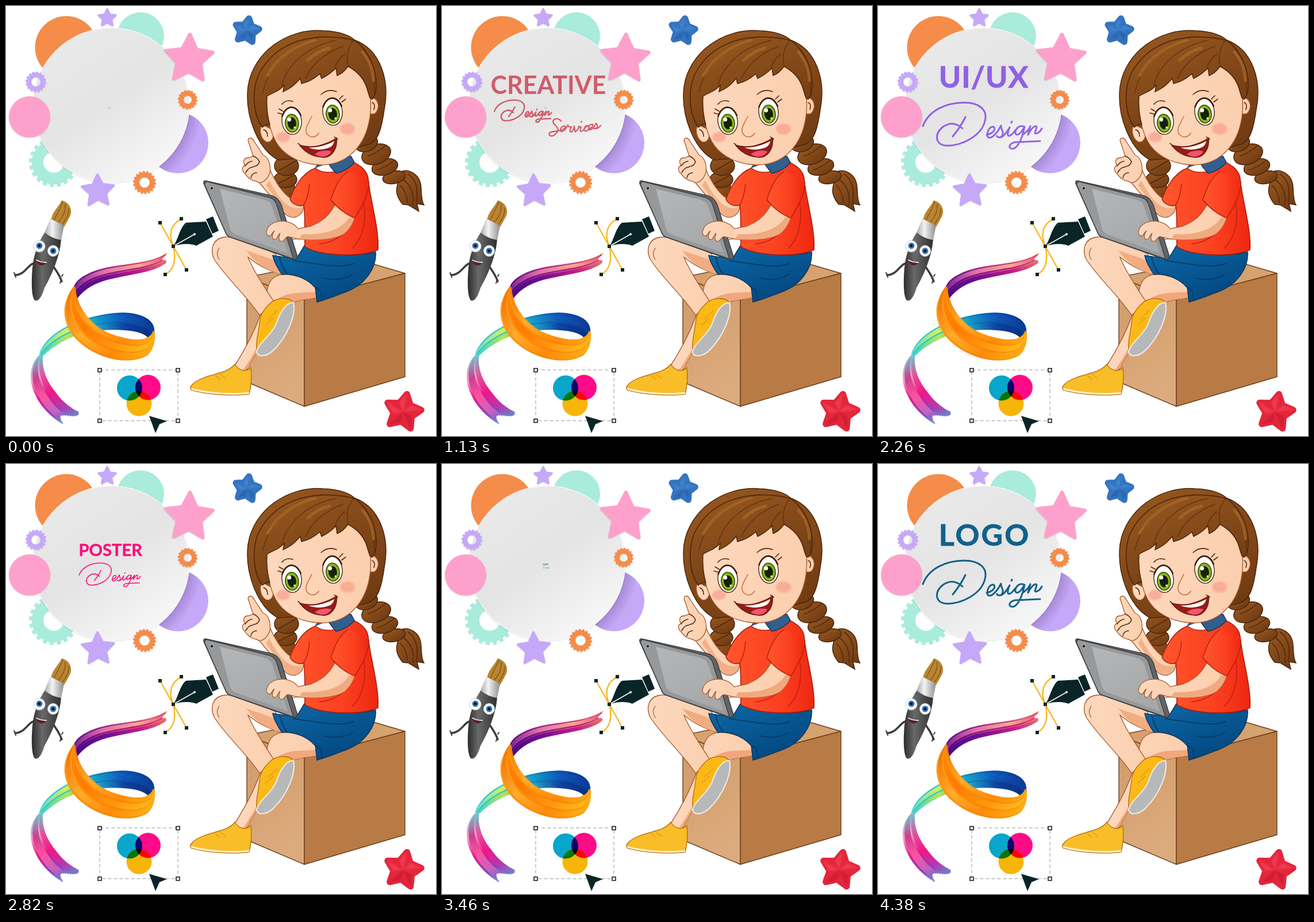
Write an HTML page that moves like this. It is 748x748 px and loops after 4590 ms.

```html
<!DOCTYPE html>
<html lang="en">
<head>
<meta charset="utf-8">
<title>Creative design services</title>
<style>
html, body { margin: 0; width: 100%; height: 100%; overflow: hidden; background: #fff }
svg { display: block; width: 100%; height: 100% }
.word text { font: 700 52px Lato, sans-serif; text-anchor: middle; fill: currentColor; stroke: currentColor; stroke-width: .8 }
.script { fill: none; stroke: currentColor; stroke-width: 3; stroke-linecap: round; stroke-linejoin: round }
.skin { fill: url(#skin); stroke: #a8572b; stroke-width: 1.3 }
.hair { fill: url(#hair); stroke: #4b250c; stroke-width: 1.5 }
.line { fill: none; stroke: #54290f; stroke-width: 1.6; stroke-linecap: round }
.soft { filter: drop-shadow(0 1px 1px #0002) }
.blur { filter: blur(1.5px) }
.mix { isolation: isolate }
.mix circle { mix-blend-mode: multiply }
</style>
</head>
<body>
<svg viewBox="0 0 748 748">
<defs>
  <linearGradient id="disc" x1=".2" y1=".1" x2=".8" y2=".95"><stop stop-color="#e9e9e9"/><stop offset=".45" stop-color="#e4e4e4"/><stop offset="1" stop-color="#f8f8f8"/></linearGradient>
  <radialGradient id="shade" gradientUnits="userSpaceOnUse" cx="183" cy="172" r="160"><stop offset=".83" stop-color="#a286d2"/><stop offset="1" stop-color="#c6a8f9"/></radialGradient>
  <linearGradient id="skin"><stop stop-color="#fdd8bd"/><stop offset="1" stop-color="#fbcfae"/></linearGradient>
  <linearGradient id="hair" x1=".2" y1="0" x2=".8" y2="1"><stop stop-color="#96571f"/><stop offset="1" stop-color="#6f3a12"/></linearGradient>
  <linearGradient id="shirt"><stop stop-color="#ff562c"/><stop offset=".6" stop-color="#fb4020"/><stop offset="1" stop-color="#ee2811"/></linearGradient>
  <linearGradient id="blue" x2=".7" y2="1"><stop stop-color="#0c6aa8"/><stop offset="1" stop-color="#034680"/></linearGradient>
  <linearGradient id="pad" x2=".6" y2="1"><stop stop-color="#b4b6b8"/><stop offset="1" stop-color="#a6a8aa"/></linearGradient>
  <linearGradient id="side" y2="1" x2=".3"><stop stop-color="#cf9a68"/><stop offset="1" stop-color="#dcab7d"/></linearGradient>
  <linearGradient id="ferrule"><stop stop-color="#aaa"/><stop offset=".4" stop-color="#f3f3f3"/><stop offset="1" stop-color="#8d8d8d"/></linearGradient>
  <linearGradient id="handle"><stop stop-color="#2c2c2c"/><stop offset=".35" stop-color="#696969"/><stop offset="1" stop-color="#303030"/></linearGradient>
  <path id="design" d="M78 209C88 182 118 168 150 168C178 168 191 182 186 200C180 226 146 243 120 243C100 242 97 224 112 211C124 202 136 203 147 213M152 193C146 206 138 217 130 227M189 224C200 222 206 214 201 210C194 209 188 220 191 228C196 232 206 224 214 208C213 214 221 220 215 227C211 230 207 228 207 226M215 228C222 224 226 216 229 211C226 218 224 226 228 226C232 226 236 220 239 216M232 203l1-2M254 210C246 206 238 214 239 222C243 228 251 218 255 210C252 224 246 244 236 248C226 250 226 240 238 237L282 235M253 223C260 218 264 212 265 209L261 224C266 214 273 206 276 210C276 216 270 222 275 222C280 221 283 217 285 213"/>
</defs>

<g id="back"></g>
<ellipse class="soft" cx="183" cy="172.500" rx="136" ry="134.500" fill="url(#disc)" stroke="#fff"/>
<g id="front" class="soft"></g>

<g class="word" color="#c4091f">
  <text x="185" y="153" style="font-size:43px;stroke:none">CREATIVE</text>
  <use href="#design" class="script" transform="translate(53.600 83) scale(.48)" style="stroke-width:5"/>
  <path class="script" style="stroke-width:2.300" d="M207 200C202 193 190 196 194 204C200 211 206 214 198 222C192 229 184 226 187 221C190 217 200 219 207 216q9-3 7-7q-6-1-8 6q1 7 9-1l4-7q0 4 6 3q-5 10 0 9q4-2 5-10q1 9 2 10q6-5 6-10q2 3 4 1q-3 8 0 8q3 0 6-5q5-6 8-4q-7-3-9 6q2 6 10-2q7-3 5-7q-6-1-7 6q1 7 9-1l4-7q5 6 0 9l-4 0q6 2 12-5M242 202l1-1"/>
</g>
<g class="word" color="#5a10e6">
  <text x="184" y="142" letter-spacing="1">UI/UX</text>
  <use href="#design" class="script"/>
</g>
<g class="word" color="#ff0a7a">
  <text x="183.500" y="140" style="font-size:60px">POSTER</text>
  <use href="#design" class="script" transform="translate(-11.500 -12) scale(1.060)"/>
</g>
<g class="word" color="#11618a">
  <text x="185.500" y="142" letter-spacing="3">LOGO</text>
  <use href="#design" class="script"/>
</g>

<!-- brush character -->
<g stroke-linecap="round">
  <path d="M47 448C38 451 32 468 16 468M79 444C80 454 90 460 97 479" fill="none" stroke="#3b3b3b" stroke-width="3.500"/>
  <path d="M16 468l-2-4m2 4l1 4M97 470l2-3m-3 9l-2 6" stroke="#3b3b3b" stroke-width="2"/>
  <path d="M78 374C80 358 90 352 97 338C112 342 118 358 109 370C106 377 103 380 101 385Z" fill="#b98532"/>
  <path d="M84 372Q92 356 99 341M91 376Q104 362 103 345M98 380Q110 365 109 352" fill="none" stroke="#8b5c16" stroke-width="1.500"/>
  <path d="M68 393L96 404C95 432 80 468 67 490C62 507 56 515 50 512C44 505 44 480 46 455C48 435 55 412 68 393Z" fill="url(#handle)"/>
  <path d="M77 370L101 382L96 407Q81 405 67 394Z" fill="url(#ferrule)"/>
  <path d="M51 441Q60 446 71 445Q67 453 59 451Q53 448 51 441Z" fill="#5c2224"/>
  <path d="M53 442Q60 446 70 446" fill="none" stroke="#eee" stroke-width="2"/>
  <path d="M66 423Q61 436 66 439Q71 438 69 425" fill="#666"/>
  <g stroke="#c9d3dc"><circle cx="58" cy="418" r="10" fill="#fff"/><circle cx="82" cy="426" r="9.500" fill="#fff"/></g>
  <circle cx="58" cy="417" r="5.500" fill="#3477bd"/><circle cx="82" cy="426" r="5.500" fill="#3477bd"/>
  <circle cx="58" cy="417" r="2.500" fill="#111"/><circle cx="82" cy="426" r="2.500" fill="#111"/>
</g>

<g id="ribbon" fill="none"></g>

<!-- pen tool -->
<path d="M268 377L314 459M305 370C280 384 286 406 291 418C296 440 294 458 277 467" fill="none" stroke="#f8b41a" stroke-width="2.200"/>
<path d="M291 418C300 405 302 386 313 377L348 375L360 401L331 417C318 412 304 414 291 418ZM348 371L360 366L370 391L359 396Z" fill="#0a2528"/>
<path d="M291 418L328 397" stroke="#fff" stroke-width="1.500"/><circle cx="328" cy="397" r="2" fill="#fff"/>
<path d="M265 374h6v6h-6zM302 367h6v6h-6zM288 415h6v6h-6zM274 464h6v6h-6zM311 456h6v6h-6z" fill="#0a2528"/>

<!-- colour circles -->
<rect x="163" y="633" width="136" height="88.500" fill="none" stroke="#9a9a9a" stroke-dasharray="6 4"/>
<path d="M160 630.500h6v6h-6zM296 630.500h6v6h-6zM160 718.500h6v6h-6zM296 718.500h6v6h-6z" fill="#fff" stroke="#111" stroke-width="1.500"/>
<g class="mix"><circle cx="215" cy="664.500" r="22" fill="#09a5cb"/><circle cx="247" cy="663.500" r="22" fill="#ff0a87"/><circle cx="231.500" cy="691.500" r="22" fill="#f7b50a"/></g>
<path d="M249 713L280 722L267 727.500L260 743Z" fill="#0a2528"/>

<!-- box -->
<g stroke="#6d3f1d" stroke-width="1.400" stroke-linejoin="round">
  <path d="M419 472L595 436L694 465L519 511Z" fill="#d6a26f"/>
  <path d="M419 472L519 511V696.500L419 654Z" fill="url(#side)"/>
  <path d="M519 511L694 465V645L519 696.500Z" fill="#b87b45"/>
</g>

<!-- braids and hair -->
<g class="hair">
  <path d="M472 308C464 325 468 340 482 350C495 340 505 325 501 308Z"/>
  <ellipse cx="486" cy="302" rx="20" ry="14"/>
  <ellipse cx="488" cy="278" rx="21" ry="17"/>
  <path d="M684 301C678 285 700 281 714 295C728 310 718 330 727 346L715 344L718 357L700 346L690 345C676 328 678 318 684 301Z"/>
  <ellipse cx="675" cy="298" rx="20" ry="11" transform="rotate(-12 675 298)"/>
  <ellipse cx="659" cy="280" rx="23" ry="14" transform="rotate(-15 659 280)"/>
  <ellipse cx="644" cy="258" rx="26" ry="17" transform="rotate(-20 644 258)"/>
  <ellipse cx="627" cy="239" rx="20" ry="14" transform="rotate(-20 627 239)"/>
  <path d="M474 268C438 250 415 190 421 140C430 80 490 38 552 43C580 44 598 51 606 59C652 76 668 130 658 180C654 210 648 236 630 241L560 260Z"/>
</g>
<path class="line" d="M475 286Q490 278 505 269M473 309Q486 303 502 294M630 261Q645 256 661 242M646 285Q660 281 676 268M691 302Q711 316 708 346M699 292Q720 306 714 342M686 312Q697 322 698 342"/>

<!-- legs -->
<path class="skin" d="M545 490C520 470 485 462 470 470C450 480 456 505 448 520C440 548 424 585 395 630C404 640 415 638 421 630C432 607 441 595 450 582L480 530C492 510 520 512 545 506Z"/>
<path d="M463 520C458 560 438 595 412 634L421 630C432 607 441 595 450 582L480 530C492 510 520 512 545 506L542 497C510 500 480 495 463 520Z" fill="#f0a77c"/>
<path class="skin" d="M469 431C440 416 405 400 380 402C358 405 355 425 362 440C380 470 420 505 441 538L467 516C454 495 432 465 421 437C440 452 455 460 480 467Z"/>
<path d="M418 425C438 433 460 438 474 446L480 467C455 460 435 450 418 425Z" fill="#f2ac82"/>
<path class="line" d="M371 421Q364 431 371 441" stroke-width="1" opacity=".5"/>
<g stroke="#b06c10" stroke-width="1.300">
  <path d="M462 515C476 505 498 508 500 518C487 526 479 542 471 557C461 577 441 587 437 601C433 588 440 565 442 545C444 532 454 522 462 515Z" fill="#fbb917"/>
  <path d="M500 516C505 536 490 575 464 600C452 611 436 611 436 601C440 585 462 573 470 553C476 535 485 516 500 516Z" fill="#b6b8ba" stroke="#eee" stroke-width="2"/>
  <path d="M456 545l16-15m-20 25l14-13" fill="none" stroke="#e39a10" stroke-width="1.500"/>
  <path d="M398 623C388 637 364 639 343 647C325 654 318 663 322 668C350 676 395 679 423 675C427 660 427 640 426 629C418 637 405 635 398 623Z" fill="#f9bd27"/>
  <path d="M322 666C350 674 395 677 423 673" fill="none" stroke="#fff1cf" stroke-width="3"/>
  <path d="M373 641l10 7m-19-5l9 7" stroke="#e39a10" stroke-width="1.500"/>
</g>
<path d="M464 434L505 440L519 417C555 436 615 435 643 428C645 455 625 485 592 497C575 503 560 510 541 515L538 490C520 470 495 465 480 467C472 455 466 445 464 434Z" fill="url(#blue)" stroke="#06375f" stroke-width="1.500"/>
<path class="line" d="M500 443C540 448 580 458 605 448M538 490C548 492 549 502 549 511M553 473C570 478 590 475 603 467M476 437Q479 452 488 465" style="stroke:#06375f"/>

<!-- body -->
<path class="skin" d="M438 304L487 363C503 374 518 363 518 346L496 335C483 328 468 306 460 286Z"/>
<path d="M452 312L490 364C502 371 515 363 516 350C495 358 475 338 458 303Z" fill="#f3b086"/>
<path class="skin" d="M421 234C422 228 428 228 432 236L447 259C457 263 461 276 459 290C455 302 444 312 436 305C424 304 420 296 414 290C409 284 412 278 416 278C411 270 414 264 422 264L430 261Z"/>
<path class="line" d="M416 278Q421 271 428 270M417 290Q421 281 430 280M426 299Q427 291 436 290M430 261Q438 264 441 271Q438 279 431 279" stroke-width="1"/>
<path d="M538 282C515 290 500 318 494 336C498 345 510 350 518 346C521 370 519 390 520 419C550 436 620 437 647 424C650 390 632 330 630 300C628 285 615 276 600 270C585 290 555 295 538 282Z" fill="url(#shirt)" stroke="#a51d0c" stroke-width="1.500"/>
<path d="M518 346C525 335 527 320 528 309M610 350C600 390 580 410 545 414M622 340C628 375 620 405 602 422" fill="none" stroke="#c4200f" stroke-width="1.600"/>
<path class="skin" d="M572 346C562 365 550 375 530 383L505 388C498 376 478 371 465 378C452 384 451 398 461 401C467 410 485 412 505 405C540 409 575 405 588 396C598 388 603 378 607 366Z"/>
<path d="M597 368C582 390 555 398 515 397L510 405C540 409 575 405 588 396C598 388 603 378 607 367Z" fill="#f0aa80"/>
<path d="M595 288C578 298 570 322 565 337C577 352 592 363 607 369C618 350 633 327 631 305" fill="url(#shirt)" stroke="#b5200d" stroke-width="1.400"/>
<path d="M538 282L545 272L560 273L568 284L574 291C588 288 600 280 606 272L600 261L575 268" fill="#325f8e" stroke="#153658" stroke-width="1.400"/>

<!-- tablet -->
<g stroke="#3f4143" stroke-width="1.500" stroke-linejoin="round">
  <path d="M347 304L463 330Q474 334 479 346L507 436Q506 441 500 441L390 402Q384 400 382 394L344 309Q343 304 347 304Z" fill="#626466"/>
  <path d="M348 305L458 333Q468 336 471 346L500 440L390 402Q384 400 382 394L345 310Z" fill="#96989a"/>
</g>
<path d="M372 318L449 337Q460 340 463 349L490 430L398 397Q392 394 390 388Z" fill="url(#pad)"/>
<circle cx="358" cy="317" r="3" fill="#2c2d2f" stroke="#ccc"/>
<path class="skin" d="M507 386C498 375 480 371 466 377C453 383 450 397 457 400C462 402 462 394 467 391C461 401 463 407 469 406C472 405 472 399 477 395C473 404 475 411 481 409C486 407 486 401 491 401L507 405" style="stroke-width:1.200"/>

<!-- head -->
<path class="skin" d="M447 207C440 210 441 229 452 236C462 239 468 228 463 215ZM634 160C645 158 651 172 645 183C641 191 631 188 628 183Z"/>
<path class="skin" d="M452 150C453 196 462 232 480 250C508 278 562 286 595 262C629 237 642 190 630 130L600 95L520 105Z"/>
<path class="line" d="M448 215q7 2 7 12M637 168q6 2 3 12" stroke-width="1"/>
<path class="hair" d="M446 211C452 206 456 204 459 207C454 190 453 172 454 157C464 150 472 151 484 138L482 149C498 142 504 135 512 126L514 135C528 132 538 125 546 118L549 126C560 121 568 114 574 108L576 121C584 118 590 112 595 105C608 112 620 123 626 138C632 154 632 163 637 162C650 150 648 90 607 60C540 44 470 58 439 120C427 150 430 190 446 211Z"/>
<path class="line" d="M595 105C592 88 594 72 605 60M607 60C630 76 642 110 641 155M553 53C500 62 460 95 447 150M573 60C525 70 490 100 480 138M586 70C550 84 530 105 521 126M590 83C578 92 573 103 573 108" stroke-width="1.200" opacity=".65"/>
<path d="M455 121C472 88 505 67 538 59M525 94Q542 78 563 73M620 80Q638 100 639 130" fill="none" stroke="#ad6c2a" stroke-width="5" stroke-linecap="round" opacity=".7"/>
<ellipse class="blur" cx="482" cy="228" rx="12" ry="9" fill="#f8a18f" opacity=".75"/><ellipse class="blur" cx="594" cy="214" rx="13" ry="10" fill="#f8a18f" opacity=".75"/>
<g id="eyes"></g>
<path class="line" d="M480 171Q487 162 499 166M548 154Q560 143 575 149M482 183l-7-4m5 9l-7-2M580 162l6-6m-2 11l7-5" stroke-width="2.200"/>
<path class="line" d="M532 192C526 204 518 214 524 223C531 231 540 228 544 221" style="stroke:#c57546"/>
<path d="M511 242C531 249 556 242 575 230C577 250 565 265 550 263C532 262 519 253 511 242Z" fill="#981b17" stroke="#6d1b10" stroke-width="1.500"/>
<path d="M526 246C542 247 558 242 571 235C570 240 567 244 563 246C550 251 538 251 526 246Z" fill="#fff"/>
<path d="M537 258C546 250 561 251 566 253C560 263 549 265 537 258Z" fill="#f3536d"/>
<path class="line" d="M508 239q3 1 4 5M571 228q4 1 6 4"/>

<g id="puffy"></g>
</svg>
<script>
const $ = id => document.getElementById(id);
const circle = (x, y, r, c) => `<circle cx="${x}" cy="${y}" r="${r}" fill="${c}"/>`;

function starPoints(x, y, R, rot, inner) {
  return Array.from({ length: 10 }, (_, i) => {
    const a = (i * 36 - 90 + rot) * Math.PI / 180, r = i % 2 ? R * inner : R;
    return [x + r * Math.cos(a), y + r * Math.sin(a)].map(v => v.toFixed(1));
  });
}
function star(x, y, R, color, rot = 0, round = 5, inner = .5) {
  return `<polygon points="${starPoints(x, y, R - round / 2, rot, inner).join(' ')}" fill="${color}" stroke="${color}" stroke-width="${round}" stroke-linejoin="round"/>`;
}
function puffyStar(x, y, R, rot, base, light, dark) {
  const pts = starPoints(x, y, R - 4, rot, .54);
  const facets = [0, 2, 4, 6, 8].map(i =>
    `<polygon points="${pts[i]} ${pts[(i + 9) % 10]} ${x},${y}" fill="${i == 4 || i == 6 ? dark : light}" opacity=".4"/>`);
  return star(x, y, R, base, rot, 11, .54) + `<g class="blur">${facets.join('')}</g>`;
}
function gear(x, y, R, hole, color, teeth) {
  const ring = (r, w, more = '') => `<circle cx="${x}" cy="${y}" r="${r}" fill="none" stroke="${color}" stroke-width="${w}" ${more}/>`;
  const body = R * .89;
  return ring((body + hole) / 2, body - hole) + ring(body, (R - body) * 2, `pathLength="${teeth * 2}" stroke-dasharray="1.100 .9"`);
}

const orange = '#f58c49', mint = '#a9ecdb', lilac = '#c6a8f9', pink = '#fea0cc';
$('back').innerHTML = circle(105, 72, 54.5, orange) + circle(234, 52, 41, mint) + circle(299, 238, 53, 'url(#shade)') + gear(83, 272, 43, 18, mint, 20);
$('front').innerHTML = circle(41, 193, 36, pink) + star(318.5, 92.5, 46, pink, 2, 6) + star(176, 21, 17.5, lilac, 0, 3) +
  star(160, 322, 31, lilac, -2, 4) + gear(52, 132, 18, 8, lilac, 16) + gear(316, 163, 17, 7, orange, 16) + gear(241, 307, 20, 9, orange, 18);
$('puffy').innerHTML = puffyStar(419, 43, 27, 10, '#3474c0', '#5b9be0', '#184a90') + puffyStar(691, 706, 37, 12, '#e4263c', '#ff5a66', '#b01228');

$('eyes').innerHTML = [[497, 200], [568, 184]].map(([x, y]) => `<g transform="translate(${x} ${y}) rotate(-6)">
  <ellipse rx="17" ry="23.500" fill="#fff" stroke="#5b2f14" stroke-width="1.500"/>
  <ellipse cy="4" rx="11.500" ry="15.500" fill="#90b51c" stroke="#496512" stroke-width="2"/>
  <ellipse cy="4" rx="7.500" ry="10.500" fill="#16200a"/><circle cx="-4" cy="-3" r="3.500" fill="#fff"/><circle cx="4" cy="12" r="2" fill="#dce99a"/>
  <path d="M-16-9Q-9-24 2-24Q13-22 17-7" fill="none" stroke="#3b1c0b" stroke-width="2.500"/></g>`).join('');

// A ribbon is a sheaf of strokes between two edge curves; fray shortens some of them.
function between(a, b, f) {
  const end = b.match(/\d+/g);
  let i = 0;
  return a.replace(/\d+/g, v => (+v + (end[i++] - v) * f).toFixed(1));
}
let ids = 0;
function ribbon(a, b, n, fray, [x1, y1, x2, y2], ...shades) {
  const base = 'r' + ids++;
  let out = shades.map((s, k) => `<linearGradient id="${base}-${k}" gradientUnits="userSpaceOnUse" x1="${x1}" y1="${y1}" x2="${x2}" y2="${y2}">` +
    s.split(' ').map((c, j, all) => `<stop offset="${j / (all.length - 1)}" stop-color="${c}"/>`).join('') + '</linearGradient>').join('');
  for (let i = 0; i <= n; i++) {
    const noise = Math.sin(i * 12.9) * .5 + .5;
    const k = Math.floor(noise * shades.length * .999);
    out += `<path d="${between(a, b, i / n)}" stroke="url(#${base}-${k})" stroke-width="2.400" pathLength="100" stroke-dasharray="${100 - fray * noise} 100"/>`;
  }
  return out;
}
$('ribbon').innerHTML =
  ribbon('M257 566C257 538 215 530 175 537C118 546 70 572 59 606', 'M251 582C246 564 205 560 165 563C122 566 85 586 61 610', 16, 0, [60, 600, 258, 560],
    '#39d5d0 #b4e65a #20b0cf #0b3fa0 #082d7c', '#18b6cf #35c9c6 #1190c4 #0a4fae #0a3690', '#60dfd0 #d7ef5c #16a4c8 #0d58b8 #0b3a94') +
  ribbon('M59 608C40 626 40 655 54 680C65 702 88 722 110 732', 'M63 606C60 636 74 660 88 676C98 690 114 702 128 708', 16, 16, [60, 606, 118, 728],
    '#5ad0d0 #e0559f #f01585 #b03ab0 #3ab0d8', '#8ac0d8 #f9a0c4 #e4148a #8b3fc0 #59c5e2', '#73c5d0 #c9408f #ff4f9f #c060c0 #2f6dc8') +
  ribbon('M119 490C122 474 150 460 186 454C224 448 262 446 286 426', 'M119 514C134 490 158 478 190 472C226 464 256 462 278 446', 15, 8, [118, 500, 288, 430],
    '#4a0a86 #6d0f92 #c51c86 #f08b62', '#5d0f8f #b1308e #f07a9d #f7b45c', '#38086f #8c1689 #b4187c #d92f7c', '#741a98 #e070a8 #f7a98c #e0417c') +
  ribbon('M119 488C98 515 97 545 118 573C150 612 212 626 245 607C257 596 259 582 257 566', 'M120 492C122 518 138 544 162 561C188 578 226 584 241 580C250 577 255 572 257 566', 24, 0, [105, 500, 255, 610],
    '#ff8a08 #ff7a00 #ff980c #ffc21c', '#ffa51c #ff900a #f7830a #f6a412', '#f07206 #ffab2a #ff8a08 #ffb514');

// Word timing: [start, end of growth] in ms
const LOOP = 4590, STEP = 40;
const spans = [[0, 960], [1130, 2090], [2260, 3340], [3380, 4380]];
const words = document.querySelectorAll('.word');
const fade = [.62, .25];

function draw(now) {
  const t = now % LOOP;
  const current = spans.findLastIndex(s => t >= s[0]);
  const [start, end] = spans[current];
  const step = Math.floor((t - start) / STEP);
  words.forEach((word, i) => {
    let size = 1, opacity = 0;
    if (i == current) {
      size = Math.max(.02, Math.min(1, step * STEP / (end - start)) ** 1.1);
      opacity = 1;
    } else if (i == current - 1) opacity = fade[step] || 0;
    word.setAttribute('transform', `translate(180 178) scale(${size}) translate(-180 -178)`);
    word.setAttribute('opacity', opacity);
  });
  requestAnimationFrame(draw);
}
draw(0);
</script>
</body>
</html>
```
